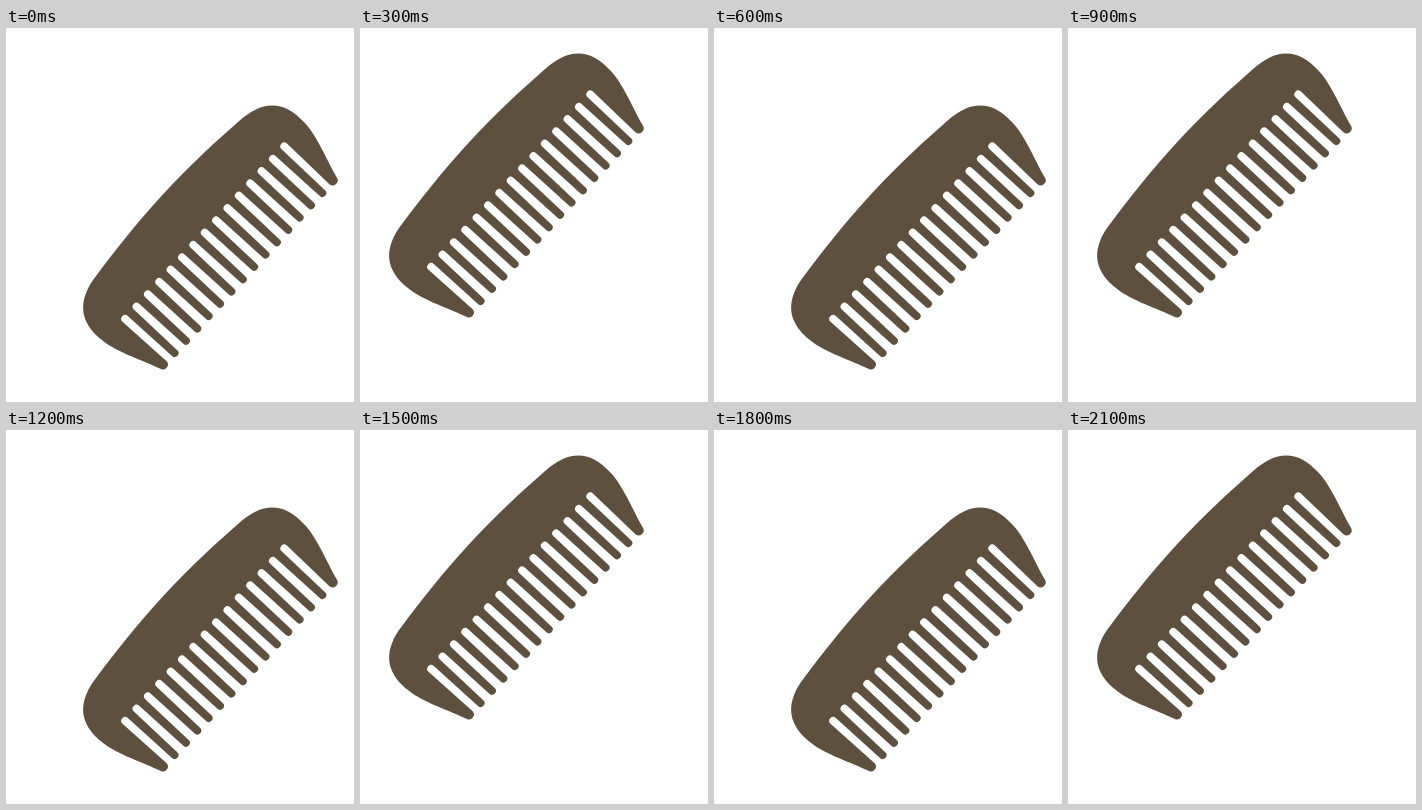
These frames come from a looping animation (348x374 px, 2400 ms). An HTML page:

```html
<!DOCTYPE html>
<html lang="en">
<head>
<meta charset="utf-8">
<title>Comb</title>
<style>
  html, body { margin: 0; width: 100%; height: 100%; overflow: hidden; background: #fff; }
  svg { display: block; width: 348px; height: 374px; }
</style>
</head>
<body>
<svg viewBox="0 0 348 374">
  <g id="comb">
    <path id="shape" fill="#5d503f" transform="translate(198.2 204.2) rotate(-47.3)"/>
  </g>
</svg>
<script>
  const STEP = 300, PITCH = 16.76, SLOT_R = 3.9, SLOT_TOP = 0.7, TOOTH_R = 3.9, TOOTH_LEN = 60.3;
  const comb = document.getElementById('comb');

  // Comb lying flat, teeth down, centred on the row of slot tops.
  function outline() {
    let d = 'M0-56C40-56 75-53 105-49.8C134-47.5 152-33 148.5 0C147.5 17 135.5 43 129.9 61A5 5 0 0 1 120.2 59.5';
    for (let i = 7; i >= -7; i--) {
      const x = i * PITCH, tooth = x - PITCH / 2;
      d += `L${x + SLOT_R} ${SLOT_TOP}A${SLOT_R} ${SLOT_R} 0 0 0 ${x - SLOT_R} ${SLOT_TOP}`;
      if (i > -7) {
        d += `L${tooth + TOOTH_R} ${TOOTH_LEN}A${TOOTH_R} ${TOOTH_R} 0 0 1 ${tooth - TOOTH_R} ${TOOTH_LEN}`;
      }
    }
    return d + 'L-120.2 59.5A5 5 0 0 1-129.9 61C-135.5 43-147.5 17-148.5 0C-152-33-134-47.5-105-49.8C-75-53-40-56 0-56Z';
  }

  function draw(now) {
    const raised = Math.floor(now / STEP) % 2;
    comb.setAttribute('transform', raised ? 'translate(-48 -52)' : '');
  }

  document.getElementById('shape').setAttribute('d', outline());
  const start = performance.now();
  function tick() {
    draw(performance.now() - start);
    requestAnimationFrame(tick);
  }
  tick();
</script>
</body>
</html>
```
